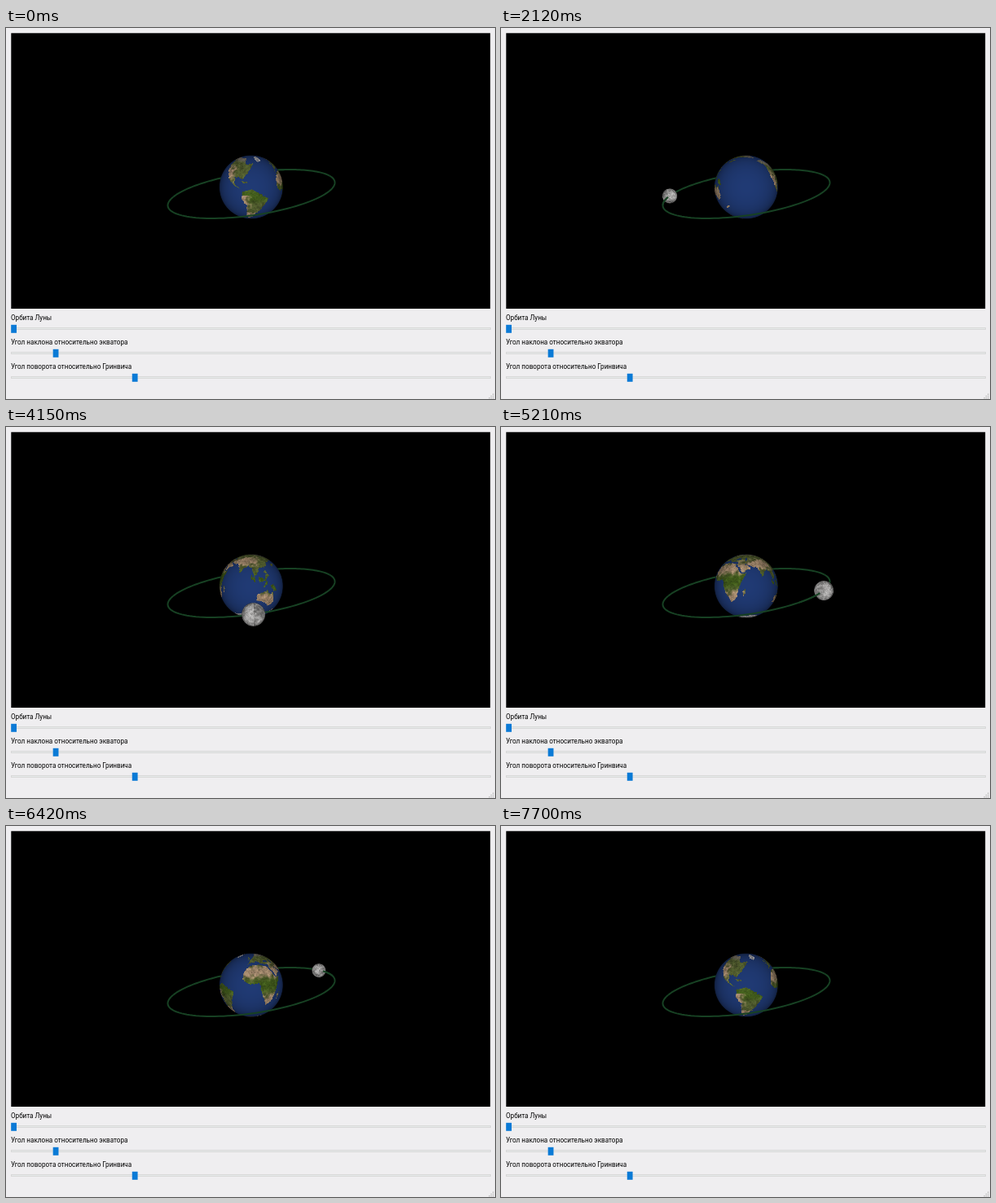
An HTML page with a canvas that plays this animation: 600x456 px, repeating every 7730 ms.

```html
<!DOCTYPE html>
<html lang="ru">
<head>
<meta charset="utf-8">
<title>Орбита Луны</title>
<style>
  html, body { margin: 0; width: 100%; height: 100%; overflow: hidden; background: #efeef0; }
  canvas, svg { position: absolute; left: 0; top: 0; display: block; }
  text { font: 8.15px Roboto, "Open Sans", sans-serif; fill: #000; }
</style>
</head>
<body>
<canvas id="view" width="600" height="456"></canvas>
<svg id="panel" width="600" height="456" viewBox="0 0 600 456"></svg>
<script>
const LOOP = 7730, TAU = Math.PI * 2, RAD = Math.PI / 180;
const ctx = document.getElementById('view').getContext('2d');

// ---------- Control panel ----------
const sliders = [
  ['Орбита Луны', 0],
  ['Угол наклона относительно экватора', .0885],
  ['Угол поворота относительно Гринвича', .2555]
];
let panel = sliders.map(([label, value], i) => {
  const y = 355 + 30 * i, x = 6.2 + 581.5 * value;
  return `<text x="6" y="${y + 3.5}">${label}</text>
    <rect x="6.5" y="${y + 13.5}" width="588" height="2" fill="#e7eaea" stroke="#d8d8d8"/>
    <rect x="${x}" y="${y + 9.8}" width="6.8" height="10" fill="#0a7ad6"/>`;
}).join('');
for (let row = 0; row < 3; row++)
  for (let col = 0; col <= row; col++)
    panel += `<rect x="${597 - col * 2.3}" y="${449.5 + row * 2.3}" width="1.4" height="1.4" fill="#b9b9b9"/>`;
document.getElementById('panel').innerHTML = panel;

// ---------- Surface maps (equirectangular, 2 px per degree) ----------
const W = 720, H = 360;
const clamp = (v, lo = 0, hi = 1) => Math.min(hi, Math.max(lo, v));
const mix = (a, b, t) => a + (b - a) * t;
const blend = (a, b, t) => a.map((v, i) => mix(v, b[i], clamp(t)));

const hash = (x, y) => {
  const s = Math.sin(x * 12.9898 + y * 78.233) * 43758.5453;
  return s - Math.floor(s);
};

// Value noise centred on zero
function noise(x, y) {
  const i = Math.floor(x), j = Math.floor(y), u = x - i, v = y - j;
  return mix(mix(hash(i, j), hash(i + 1, j), u), mix(hash(i, j + 1), hash(i + 1, j + 1), u), v) - .5;
}

function makeMap(colorAt) {
  const data = new Uint8ClampedArray(W * H * 3);
  for (let y = 0; y < H; y++)
    for (let x = 0; x < W; x++) data.set(colorAt(x, y), (y * W + x) * 3);
  return data;
}

// Simplified continents; noise roughens their coasts later.
function landMask() {
  const c = document.createElement('canvas');
  c.width = W;
  c.height = H;
  const g = c.getContext('2d', { willReadFrequently: true });
  g.setTransform(2, 0, 0, -2, W / 2, H / 2);
  const land = (...p) => {
    g.beginPath();
    for (let i = 0; i < p.length; i += 2) g.lineTo(p[i], p[i + 1]);
    g.fill();
  };
  const spot = (lon, lat, rx, ry, turn = 0) => {
    g.beginPath();
    g.ellipse(lon, lat, rx, ry, turn * RAD, 0, TAU);
    g.fill();
  };
  // Americas
  land(-166, 60, -156, 71, -95, 70, -82, 53, -62, 58, -70, 43, -81, 26, -97, 29, -95, 18, -79, 8, -105, 20, -123, 38, -135, 58);
  land(-78, 8, -62, 11, -35, -6, -48, -27, -67, -54, -73, -48, -71, -18, -81, -5);
  // Africa, Eurasia, Australia
  land(-6, 35, 11, 37, 32, 31, 43, 12, 51, 12, 40, -10, 34, -26, 20, -35, 12, -15, 9, 4, -8, 4, -17, 14, -15, 24);
  land(-9, 38, 0, 48, 10, 56, 25, 71, 105, 77, 178, 68, 140, 54, 122, 38, 121, 28, 108, 20, 108, 11, 103, 3, 97, 17,
    89, 22, 78, 8, 70, 23, 57, 26, 49, 30, 59, 21, 45, 13, 35, 29, 36, 36, 21, 38, 12, 45);
  land(114, -23, 131, -12, 138, -17, 142, -11, 153, -27, 147, -38, 130, -32, 115, -34);
  // Greenland, Madagascar, Japan, New Zealand, Britain, Cuba, New Guinea, Borneo, Sumatra
  spot(-42, 72, 13, 11);
  spot(47, -19, 2.2, 6, -15);
  spot(138, 38, 2, 7, -40);
  spot(173, -41, 2, 6, -35);
  spot(-3, 54, 2, 4);
  spot(-77, 21, 6, 1.2, -15);
  spot(141, -5, 9, 3, -20);
  spot(114, 1, 4, 4.5);
  spot(102, 0, 7, 2, -45);
  // Philippine and Indonesian islands
  for (let i = 0; i < 8; i++) spot(119 + 7 * hash(i, 1), 16 - 3.4 * i, 1.8, 2.2);
  // Black Sea, Caspian Sea, Red Sea
  g.globalCompositeOperation = 'destination-out';
  spot(35, 43, 6, 2);
  spot(51, 42, 2.2, 5);
  spot(38, 21, 1.4, 10, 30);
  const data = g.getImageData(0, 0, W, H).data;
  return (x, y) => data[(clamp(y | 0, 0, H - 1) * W + (x + W | 0) % W) * 4 + 3] / 255;
}

const SEA = [32, 58, 116], ICE = [165, 165, 172], TUNDRA = [122, 116, 104];
const SAND = [164, 138, 110], GRASS = [84, 96, 48], FOREST = [66, 92, 28];

// Deserts follow the subtropical belts; the northern one climbs towards Central Asia.
function climate(lon, lat, rough) {
  const americas = lon < -30;
  let dry;
  if (lat > 0) {
    const axis = americas ? 34 : 24 + .2 * Math.max(0, lon - 45);
    const east = americas ? -98 : 106;
    dry = Math.min(1.6 - Math.abs(lat - axis) / 9, (east - lon) / 8);
  } else {
    dry = americas ? Math.max(-lat - 30, -66 - lon) / 8 : (-lat - 15) / 7;
  }
  let color = blend(GRASS, FOREST, 1.5 - Math.abs(lat) / 10);
  color = blend(color, SAND, dry + rough * 1.5);
  color = blend(color, TUNDRA, (lat - 56) / 8);
  const greenland = lat > 59 && Math.abs(lon + 42) < 16;
  return greenland || lat < -60 ? ICE : blend(color, ICE, (lat - 72) / 5);
}

function earthMap() {
  const mask = landMask();
  return makeMap((x, y) => {
    const lon = x / 2 - 180, lat = 90 - y / 2;
    const rough = noise(x / 8, y / 8);
    const inland = mask(x + 6 * noise(x / 5, y / 5 + 50), y + 6 * noise(x / 5 + 50, y / 5));
    const polar = lat < -71 + 8 * noise(x / 30, 7) ? 1 : 0;
    const shade = 1 + .35 * rough + .3 * noise(x / 3, y / 3);
    return blend(SEA, climate(lon, lat, rough).map(v => v * shade), Math.max(inland, polar));
  });
}

const moonMap = () => makeMap((x, y) => {
  const grey = 158 + 75 * noise(x / 60, y / 60) + 70 * noise(x / 20, y / 20) + 45 * noise(x / 7, y / 7);
  return [grey, grey - 1, grey - 2];
});

const earth = earthMap(), moon = moonMap();

// ---------- Sphere renderer ----------
function rotate(p, i, j, angle) {
  const c = Math.cos(angle), s = Math.sin(angle), a = p[i], b = p[j];
  p[i] = a * c - b * s;
  p[j] = a * s + b * c;
}

// Axes of the map as seen by the viewer: x right, y up, z forward.
function orientation(tilt, spin, pitch, roll) {
  return [[1, 0, 0], [0, 1, 0], [0, 0, 1]].map(axis => {
    rotate(axis, 1, 2, tilt);
    rotate(axis, 2, 0, spin);
    rotate(axis, 1, 2, pitch);
    rotate(axis, 0, 1, -roll);
    return axis;
  });
}

const SIZE = 84;
const scratch = document.createElement('canvas');
scratch.width = scratch.height = SIZE;
const sctx = scratch.getContext('2d');

function drawSphere(map, cx, cy, r, axes, lon0, persp, ambient) {
  const x0 = Math.round(cx) - SIZE / 2, y0 = Math.round(cy) - SIZE / 2;
  const img = sctx.createImageData(SIZE, SIZE), out = img.data;
  const e2 = persp * persp, scale = r * Math.sqrt(1 - e2);
  const dot = (a, x, y, z) => a[0] * x + a[1] * y + a[2] * z;
  for (let j = 0; j < SIZE; j++) for (let i = 0; i < SIZE; i++) {
    const dx = x0 + i + .5 - cx, dy = cy - (y0 + j + .5), d = Math.hypot(dx, dy);
    const alpha = Math.min(1, r - d + .5);
    if (alpha <= 0) continue;
    const q2 = (d / scale) ** 2;
    const z = (q2 * persp + Math.sqrt(Math.max(0, 1 - q2 * (1 - e2)))) / (1 + q2 * e2);
    const k = (1 - persp * z) / scale, x = dx * k, y = dy * k;
    const lat = Math.asin(clamp(dot(axes[1], x, y, z), -1, 1));
    const lon = Math.atan2(dot(axes[0], x, y, z), dot(axes[2], x, y, z)) + lon0;
    const u = (Math.floor((lon / TAU + .5) * W) % W + W) % W;
    const v = Math.min(H - 1, Math.floor((.5 - lat / Math.PI) * H));
    const light = mix(ambient, 1, clamp((z - persp) / (1 - persp)) ** .6);
    const src = (v * W + u) * 3, dst = (j * SIZE + i) * 4;
    for (let c = 0; c < 3; c++) out[dst + c] = map[src + c] * light;
    out[dst + 3] = alpha * 255;
  }
  sctx.putImageData(img, 0, 0);
  ctx.drawImage(scratch, x0, y0);
}

// ---------- Orbit ----------
const DEPTH = .355, MOON_ANGLE = .098;

// Angle 0 lies behind the planet; depth shrinks the far side.
function orbitPoint(a) {
  const far = 1 + DEPTH * Math.cos(a);
  const s = Math.sqrt(1 - DEPTH * DEPTH) * Math.sin(a) / far;
  const c = (Math.cos(a) + DEPTH) / far;
  return { x: 301 - 102.5 * s, y: 204 + 14 * s - 26.5 * c, r: 9.35 / far };
}

function drawArc(from, to) {
  ctx.beginPath();
  for (let i = 0; i <= 80; i++) {
    const p = orbitPoint(mix(from, to, i / 80));
    ctx.lineTo(p.x, p.y);
  }
  ctx.strokeStyle = '#174123';
  ctx.lineWidth = 2;
  ctx.stroke();
}

function drawMoon(angle) {
  const p = orbitPoint(angle);
  drawSphere(moon, p.x - .3, p.y + .4, p.r, orientation(.1, angle, .2, 0), 0, .05, .25);
  // The nearer part of the orbit emerges in front of the moon
  const gap = Math.PI - angle, dir = Math.sign(gap);
  if (Math.abs(gap) > MOON_ANGLE)
    drawArc(angle + dir * MOON_ANGLE, angle + dir * Math.min(Math.abs(gap), .4));
}

// ---------- Scene ----------
function render(t) {
  const turn = TAU * t / LOOP;
  const angle = (turn - 12.2 * RAD + TAU) % TAU;
  const behind = Math.cos(angle) > 0;
  ctx.clearRect(0, 0, 600, 456);
  ctx.fillStyle = '#000';
  ctx.fillRect(6.3, 6.3, 587.9, 338.7);
  drawArc(-Math.PI / 2, Math.PI / 2);
  if (behind) drawMoon(angle);
  const axes = orientation(14 * RAD, turn - 24 * RAD, 1.5 * RAD, 8 * RAD);
  drawSphere(earth, 300.8, 195.5, 39, axes, -90 * RAD, .14, .28);
  drawArc(Math.PI / 2, Math.PI * 1.5);
  if (!behind) drawMoon(angle);
}

const start = performance.now();
function tick() {
  render((performance.now() - start) % LOOP);
  requestAnimationFrame(tick);
}
tick();
</script>
</body>
</html>
```
